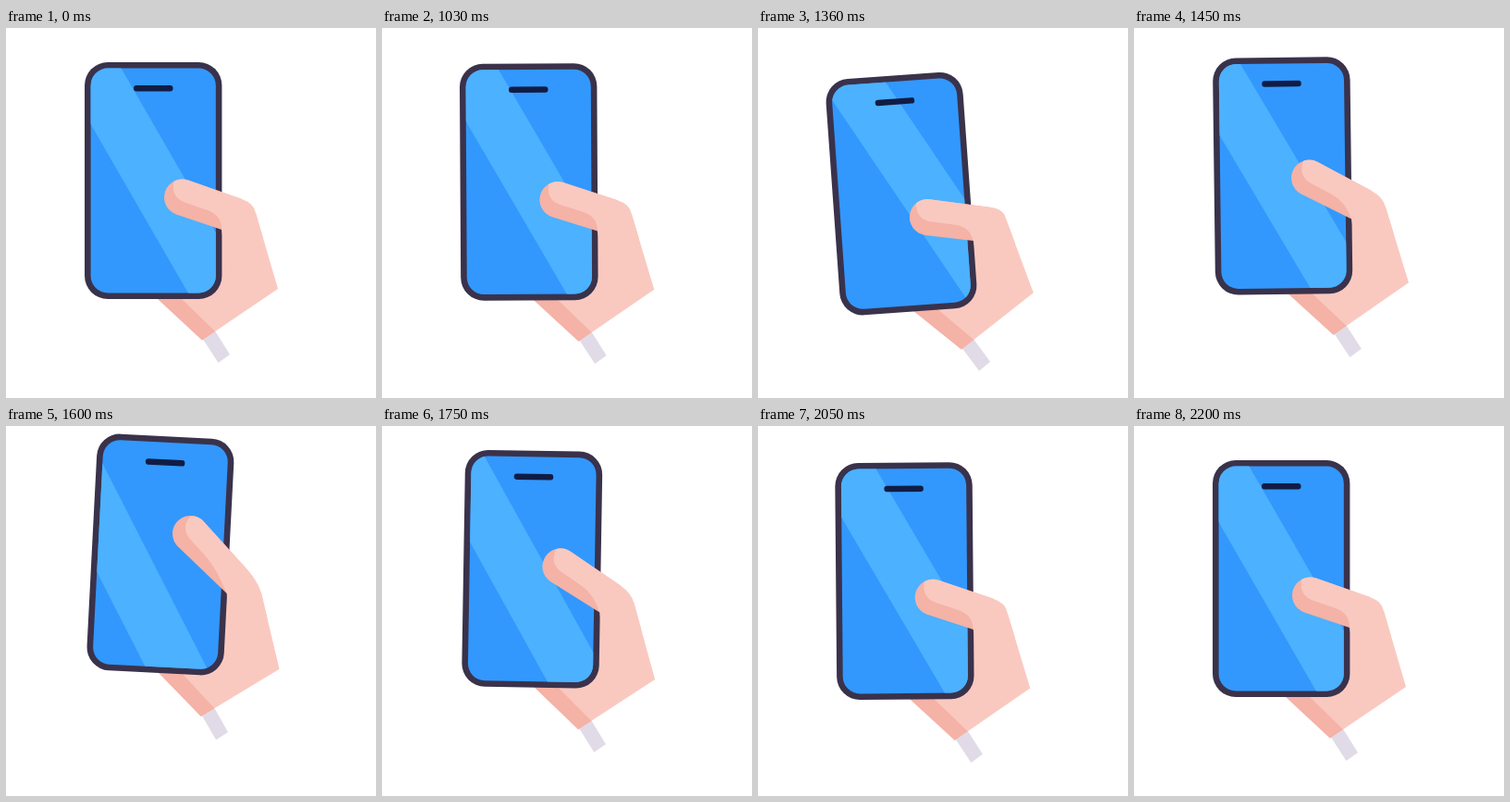
These frames come from a looping animation (400 by 400 pixels, 2.23 s). An HTML page with a canvas:

```html
<!DOCTYPE html>
<html lang="en">
<head>
<meta charset="utf-8">
<title>Phone in hand</title>
<style>
  html, body { margin: 0; height: 100%; overflow: hidden; background: #fff; }
  canvas { display: block; }
</style>
</head>
<body>
<canvas id="stage" width="400" height="400"></canvas>
<script>
const ctx = document.getElementById('stage').getContext('2d');
const LOOP = 2230, START = 1000, STEP = 30, RAD = Math.PI / 180;
const SKIN = '#f9c9c0', SHADE = '#f5b2a6', SLEEVE = '#e0dbe7';
const CENTER = { x: 159, y: 165 }, TIP = 19.5;

// A shake that dies away: sway moves the whole, tilt is in degrees, bend lifts the thumb.
const KEYS = [
  { time: START, sway: 0, tilt: 0, bend: 0 },
  { time: 1215, sway: 1, tilt: -6.9, bend: -1 },
  { time: 1620, sway: -0.87, tilt: 3, bend: 1.42 },
  { time: 1880, sway: 0.19, tilt: -1.1, bend: 0 },
  { time: 2200, sway: 0, tilt: 0, bend: 0 }
];

function poseAt(time) {
  const next = KEYS.findIndex(key => key.time > time);
  if (next < 1) return KEYS[0];
  const a = KEYS[next - 1], b = KEYS[next];
  const ease = (1 - Math.cos(Math.PI * (time - a.time) / (b.time - a.time))) / 2;
  const mix = name => a[name] + (b[name] - a[name]) * ease;
  return { sway: mix('sway'), tilt: mix('tilt'), bend: mix('bend') };
}

function polygon(color, ...points) {
  ctx.beginPath();
  points.forEach(p => ctx.lineTo(...p));
  ctx.fillStyle = color;
  ctx.fill();
}

function roundRect(x, y, w, h, r, color) {
  ctx.beginPath();
  ctx.roundRect(x, y, w, h, r);
  ctx.fillStyle = color;
  ctx.fill();
}

function drawPalm(crotch) {
  polygon(SLEEVE, [212, 335], [225, 326], [242, 353], [229.5, 362]);
  polygon(SKIN, crotch, [270, 200], [294, 282], [212, 337.5], [162, 291], [200, 250]);
  polygon(SHADE, [162, 291], [212, 337.5], [226, 328], [188, 291]);
}

function drawPhone(glare) {
  roundRect(85, 37, 148.4, 256, 25, '#3a324b');
  ctx.save();
  roundRect(91.6, 43.6, 135.2, 242.8, 18.5, '#3298fd');
  ctx.clip();
  const left = 56.4 + glare, width = 67.8, slant = 140.8;
  polygon('#4cb1fe', [left, 43], [left + width, 43], [left + width + slant, 287], [left + slant, 287]);
  ctx.restore();
  roundRect(138, 62, 42.5, 6.5, 3, '#111c45');
}

function drawThumb(tilt, bend, crotch) {
  const tipX = 190.5 + 1.4 * tilt - 2.9 * bend, tipY = 183 - 30 * bend;
  const knuckleX = 255, knuckleY = 185 - 5.2 * bend;
  // the upper edge runs from the knuckle as a tangent to the round tip
  const dx = knuckleX - tipX, dy = knuckleY - tipY;
  const angle = Math.atan2(dy, dx) + Math.asin(TIP / Math.hypot(dx, dy));
  const cos = Math.cos(angle), sin = Math.sin(angle);
  const at = (x, y) => [tipX + x * cos - y * sin, tipY + x * sin + y * cos];
  const turn = (from, to) => ctx.arc(tipX, tipY, TIP, angle + from * RAD, angle + to * RAD);

  ctx.beginPath();
  ctx.moveTo(...crotch);
  turn(90, 270);
  ctx.lineTo(knuckleX, knuckleY);
  ctx.fillStyle = SHADE;
  ctx.fill();

  ctx.beginPath();
  turn(222.5, 270);
  ctx.lineTo(knuckleX, knuckleY);
  ctx.quadraticCurveTo(knuckleX + 14 * cos, knuckleY + 14 * sin, 270, 200);
  ctx.lineTo(278.2, 228);
  ctx.lineTo(240, 260);
  ctx.lineTo(...crotch);
  ctx.quadraticCurveTo(...at(47, 4.5), ...at(30.6, 4.2));
  ctx.lineTo(...at(5, 4.3));
  ctx.quadraticCurveTo(...at(-12, 4.3), ...at(-14.3, -13.2));
  ctx.fillStyle = SKIN;
  ctx.fill();
}

function draw() {
  const now = performance.now() % LOOP;
  const { sway, tilt, bend } = poseAt(START + Math.floor((now - START) / STEP) * STEP);
  const crotch = [233, 218 - 10.5 * bend];
  ctx.fillStyle = '#fff';
  ctx.fillRect(0, 0, 400, 400);
  ctx.save();
  ctx.translate(CENTER.x - 9 * sway, CENTER.y + 30.3 * sway);
  ctx.rotate(tilt * RAD);
  ctx.translate(-CENTER.x, -CENTER.y);
  drawPalm(crotch);
  drawPhone(56 * sway);
  drawThumb(tilt, bend, crotch);
  ctx.restore();
  requestAnimationFrame(draw);
}
draw();
</script>
</body>
</html>
```
